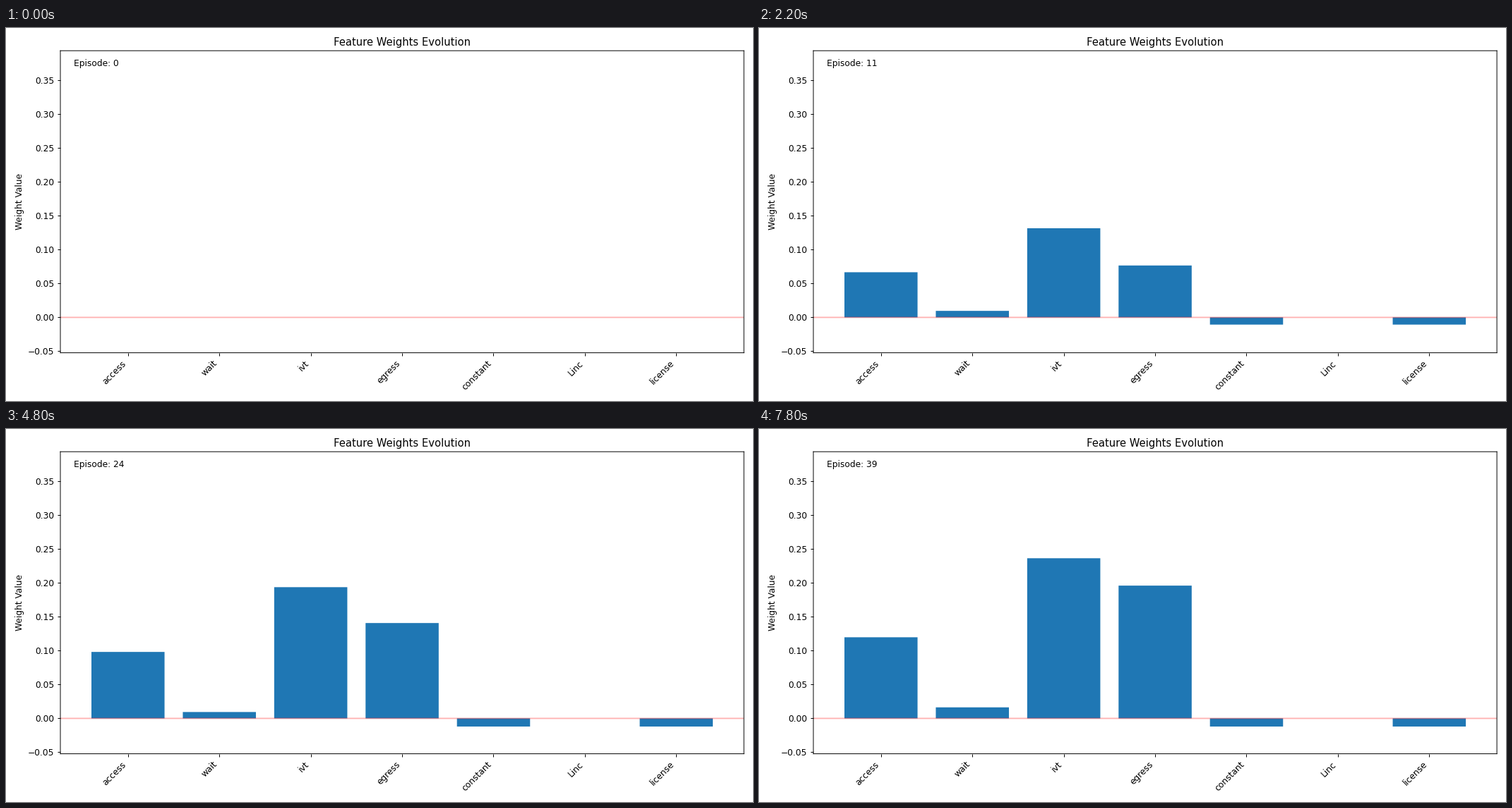
Recreate the animation shown at these times as a matplotlib script. Size 1058x529 px, loop 8000 ms.

```python
import matplotlib.pyplot as plt
import numpy as np
from matplotlib.animation import FuncAnimation

WIDTH, HEIGHT = 1058, 529
DPI = 88.1667  # a 12 x 6 inch figure
EPISODES = 40
INTERVAL = 200

plt.rcParams["font.family"] = "DejaVu Sans"
plt.rcParams["path.snap"] = False  # soft, subpixel edges


def learning(gain, tempo):
    """Weight that keeps growing, ever more slowly."""
    return lambda episode: gain * np.log1p(episode / tempo)


def wait(episode):
    """Quick rise, then a shallow valley."""
    return (0.0088 + 1.7e-5 * (episode - 18) ** 2) * (1 - np.exp(-episode / 1.5))


def bias(episode):
    """Quick drop to a steady level with one early rebound."""
    rebound = 0.0037 * np.exp(-((episode - 7.5) / 3.5) ** 2)
    return (rebound - 0.012) * (1 - np.exp(-episode))


FEATURES = {
    "access": learning(0.0504, 4),
    "wait": wait,
    "ivt": learning(0.0995, 4),
    "egress": learning(0.203, 24),
    "constant": bias,
    "Linc": lambda episode: 0,
    "license": bias,
}

fig, ax = plt.subplots(figsize=(12, 6), dpi=DPI)
fig.subplots_adjust(left=77 / WIDTH, right=1045.1 / WIDTH,
                    bottom=1 - 460.6 / HEIGHT, top=1 - 32.2 / HEIGHT)

bars = ax.bar(range(len(FEATURES)), np.zeros(len(FEATURES)), color="#1f77b4")
ax.axhline(0, color="red", alpha=0.3)
ax.set_xlim(-0.74, 6.74)
ax.set_ylim(-0.0522, 0.3935)
ax.set_xticks(range(len(FEATURES)), list(FEATURES), rotation=45, ha="right")
ax.set_ylabel("Weight Value")
ax.set_title("Feature Weights Evolution")
label = ax.text(0.02, 0.95, "", transform=ax.transAxes)


def update(episode):
    for bar, weight in zip(bars, FEATURES.values()):
        bar.set_height(weight(episode))
    label.set_text(f"Episode: {episode}")
    return [*bars, label]


anim = FuncAnimation(fig, update, frames=EPISODES, interval=INTERVAL,
                     repeat=True, repeat_delay=0, blit=False)
plt.show()
```
